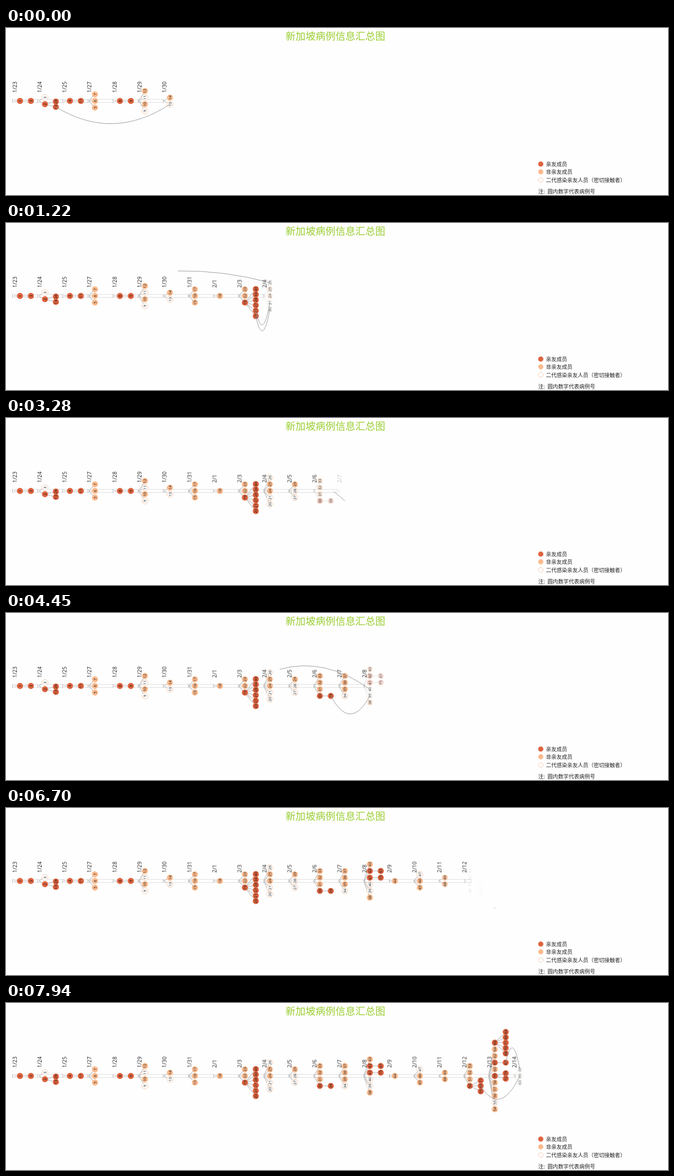
These frames come from a looping animation (1280 px wide and 324 px high, 7990 ms). An HTML page:

```html
<!DOCTYPE html>
<html lang="zh-CN">
<head>
<meta charset="utf-8">
<title>病例信息汇总图</title>
<style>
html, body { margin: 0; width: 100%; height: 100%; overflow: hidden; background: #fefefe; }
svg { display: block; width: 1280px; height: 324px; }
text { fill: #222; font-family: "Noto Sans CJK SC", "Noto Sans CJK", sans-serif; }
.title { fill: #9acd32; font-size: 19.3px; text-anchor: middle; }
.legend { font-size: 10.25px; }
.date { font: 10.4px "Open Sans", "Noto Sans", sans-serif; }
.num { font: 7.5px "Open Sans", "Noto Sans", sans-serif; text-anchor: middle; fill: #111; }
.axis { fill: none; stroke: #dedede; }
.tick { stroke: #b5b5b5; }
.link { fill: none; stroke: #c2c2c2; stroke-width: 1.3; }
.arc { fill: none; stroke: #999; stroke-width: 1; }
.r { fill: #de6440; }
.o { fill: #fcbb8e; }
.w { fill: #fff; stroke: #f3c8ad; }
</style>
</head>
<body>
<svg id="stage" viewBox="0 0 1280 324"></svg>
<script>
const LOOP = 7990, MID = 141.5, SPEED = 0.52;
const AXIS_X = 12.5, AXIS_STEP = 48.6;
const NODE_X = 27, NODE_STEP = 48.32, CHILD_DX = 21.1;
const ROW = 12.9, CHILD_ROW = 10.45, R = 5.9;
const CLEAR = [330, 1940, 2920, 4070, 5040, 6240, 7580, LOOP];

// date, start time, nodes from bottom to top (r/o/w = kind, ">" = children)
const DAYS = [
  ['1/23', null, 'r1>3'],
  ['1/24', null, 'r2>13,26 w3'],
  ['1/25', null, 'r4>11'],
  ['1/27', null, 'o5 o6 o7'],
  ['1/28', null, 'r8>9'],
  ['1/29', null, 'w9 o10 w11 o12'],
  ['1/30', -1000, 'w13 o14'],
  ['1/31', 330, 'o15 o16 o17'],
  ['2/1', 490, 'o18'],
  ['2/3', 650, 'r19>20,21,27,28,34,40 o22 o23'],
  ['2/4', 860, 'w20 w21 o24 o25 w26'],
  ['2/5', 1940, 'w27 w28 o29'],
  ['2/6', 2905, 'r30>39 o31 o32 o33'],
  ['2/7', 3212, 'w34 o35 o36 o37'],
  ['2/8', 4080, 'o38 w39 w40 r41>75 r42>47 o43'],
  ['2/9', 5070, 'o44'],
  ['2/10', 5370, 'o45 o46 w47'],
  ['2/11', 6240, 'o48 o49'],
  ['2/12', 6475, 'r50>55,65,77 o51 o52 o53'],
  ['2/13', 6682, 'o54 w55 o56 o57 o58 r59>72,79 o60 r61>67 o62 o64 r66>68,70,71,80,84'],
  ['2/14', 7600, 'w63 w65 w67']
];

const stage = document.getElementById('stage');

function add(tag, attrs, parent = stage, label) {
  const el = document.createElementNS('http://www.w3.org/2000/svg', tag);
  for (const k in attrs) el.setAttribute(k, attrs[k]);
  if (label) el.textContent = label;
  parent.appendChild(el);
  return el;
}

// keys: [time in ms, properties]
function play(el, keys) {
  const frames = keys.map(([t, p]) => ({ ...p, offset: Math.min(1, Math.max(0, t / LOOP)) }));
  el.animate(frames, { duration: LOOP, iterations: Infinity });
}

function fade(el, start, from, to, easing = 'linear') {
  if (start === null || start < 0) return;
  play(el, [
    [0, { opacity: 0 }],
    [start + from, { opacity: 0, easing }],
    [start + to, { opacity: 1 }],
    [LOOP, { opacity: 1 }]
  ]);
}

const axis = add('rect', { class: 'axis', x: AXIS_X, y: MID - 3, width: 6 * AXIS_STEP, height: 6 });
const links = add('g'), nodes = add('g'), arcs = add('g');
const sources = {};

function link(d, start) {
  fade(add('path', { class: 'link', d }, links), start, 330, 560, 'ease-out');
}

function node(kind, num, x, y, start) {
  fade(add('circle', { class: kind, cx: x, cy: y, r: R }, nodes), start, 330, 560, 'ease-out');
  const pos = `translate(${x + 2.7} ${y}) rotate(-90)`;
  fade(add('text', { class: 'num', transform: pos }, nodes, num), start, 200, 400);
}

// Grows from the new case back to its contact, then is cleared.
function arc(from, x, y, start) {
  const dir = (from.y - from.parentY || from.y - MID) > 0 ? 1 : -1;
  const d = `M${x} ${y}Q${(x + from.x) / 2} ${(y + from.y) / 2 + dir * 70} ${from.x} ${from.y}`;
  const el = add('path', { class: 'arc', d }, arcs);
  const len = el.getTotalLength();
  const end = CLEAR.find(t => t > start);
  const begin = start + 15;
  el.style.strokeDasharray = `${len} ${len + 10}`;
  const hidden = { opacity: 0, strokeDashoffset: len };
  const full = { opacity: 1, strokeDashoffset: 0 };
  const gone = { opacity: 0, strokeDashoffset: 0 };
  const keys = start < 0 ? [[0, full]] : [
    [0, hidden], [begin, hidden],
    [begin, { opacity: 1, strokeDashoffset: len }],
    [Math.min(end, begin + len / SPEED), full]
  ];
  keys.push([end, full]);
  if (end < LOOP) keys.push([end, gone], [LOOP, gone]);
  play(el, keys);
}

const growth = [[0, { width: 6 * AXIS_STEP + 'px' }]];

DAYS.forEach(([date, start, list], i) => {
  const tx = AXIS_X + i * AXIS_STEP;
  const x = NODE_X + i * NODE_STEP, root = x - 12, cx = x + CHILD_DX;
  const items = list.split(' ');

  fade(add('line', { class: 'tick', x1: tx, x2: tx, y1: MID - 3.5, y2: MID + 3.5 }, links), start, 20, 200);
  const pos = `translate(${x - 6.5} 125.5) rotate(-90)`;
  fade(add('text', { class: 'date', transform: pos }, nodes, date), start, 20, 200);
  if (start > 0) {
    growth.push([start, { width: (i - 1) * AXIS_STEP + 'px' }], [start + 75, { width: i * AXIS_STEP + 'px' }]);
  }

  items.forEach((item, k) => {
    const [head, tail] = item.split('>');
    const kind = head[0], num = head.slice(1);
    const y = MID + ((items.length - 1) / 2 - k) * ROW;
    link(`M${root} ${MID}L${x} ${y}`, start);
    const kids = tail ? tail.split(',') : [];
    kids.forEach((kid, j) => {
      const ky = y + ((kids.length - 1) / 2 - j) * CHILD_ROW;
      link(`M${x} ${y}L${cx} ${ky}`, start);
      node('r', kid, cx, ky, start && start + 15);
      sources[kid] = { x: cx, y: ky, parentY: y };
    });
    node(kind, num, x, y, start);
    if (kind === 'w' && sources[num] && start !== null) arc(sources[num], x, y, start);
  });
});

growth.push([LOOP, { width: 20 * AXIS_STEP + 'px' }]);
play(axis, growth);

add('text', { class: 'title', x: 637, y: 22.5 }, stage, '新加坡病例信息汇总图');
[['r', 264, '亲友成员'], ['o', 279, '非亲友成员'], ['w', 294.7, '二代感染亲友人员（密切接触者）']]
  .forEach(([kind, y, label]) => {
    add('circle', { class: kind, cx: 1034, cy: y, r: kind === 'w' ? 4.6 : 5 });
    add('text', { class: 'legend', x: 1044, y: y + 3.8 }, stage, label);
  });
add('text', { class: 'legend', x: 1029, y: 320.6 }, stage, '注:');
add('text', { class: 'legend', x: 1047, y: 320.6 }, stage, '圆内数字代表病例号');
</script>
</body>
</html>
```
